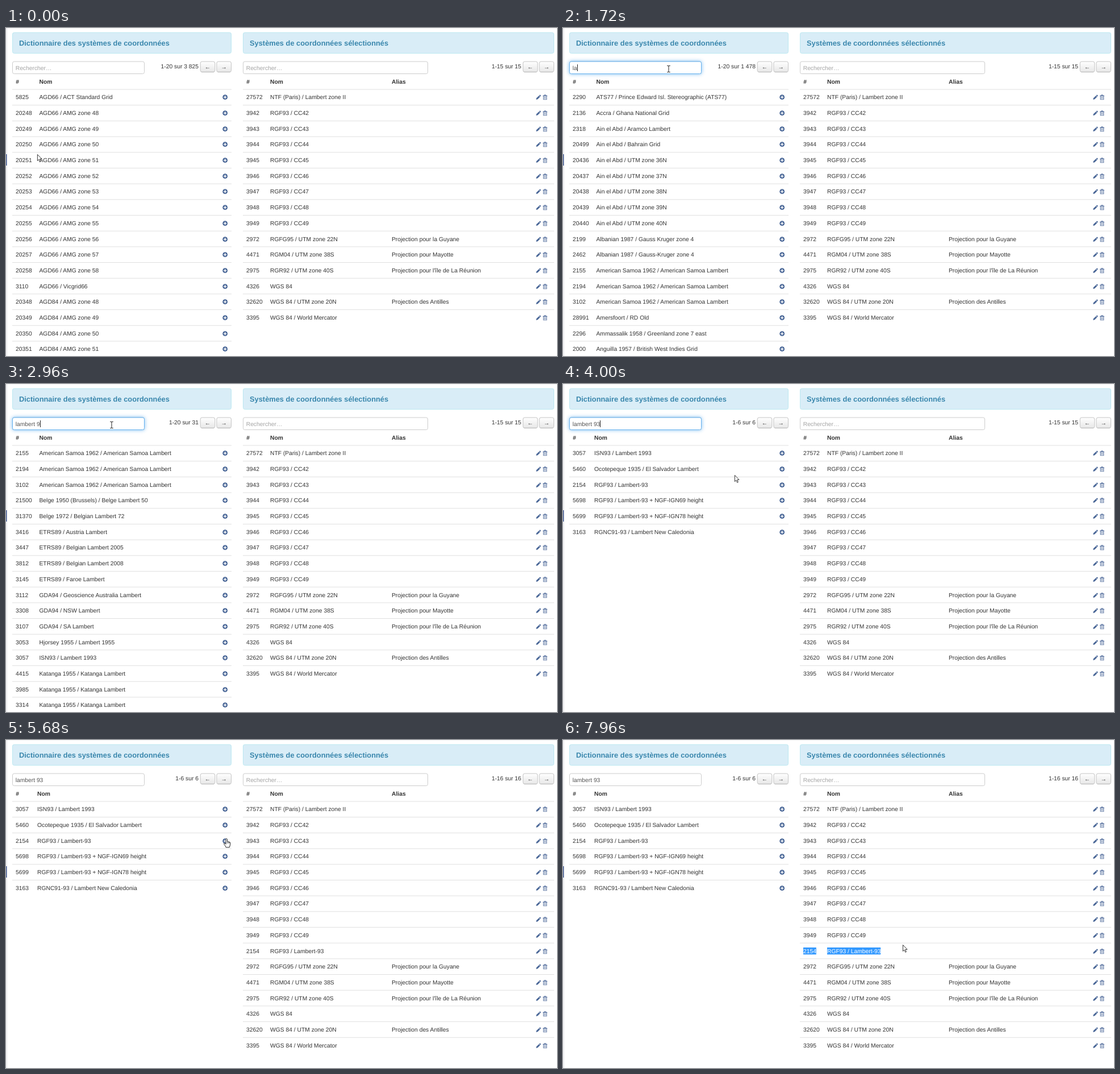
Recreate the animation shown at these times as an HTML page with a canvas. Size 970 by 577 pixels, loop 8 s.

```html
<!DOCTYPE html>
<html lang="fr">
<head>
<meta charset="utf-8">
<title>Systèmes de coordonnées</title>
<style>
  html, body { margin: 0; width: 100%; height: 100%; overflow: hidden; background: #fff; }
  canvas { display: block; }
</style>
</head>
<body>
<canvas id="stage" width="970" height="577"></canvas>
<script>
const ctx = document.getElementById('stage').getContext('2d');
const LOOP = 8000, STEP = 40;
const ROW_TOP = 107.6, ROW_PITCH = 27.68;
const FONT = '10.3px "Liberation Sans", Arial, sans-serif';
const BOLD = 'bold ' + FONT;
const TITLE = 'bold 12.85px "Liberation Sans", Arial, sans-serif';
const ICON = '#4a6797';

// Result lists: "id name"
const zones = (datum, base, from, to) =>
  Array.from({ length: to - from + 1 }, (_, i) => `${base + from + i} ${datum} / AMG zone ${from + i}`);
const initial = ['5825 AGD66 / ACT Standard Grid', ...zones('AGD66', 20200, 48, 58),
  '3110 AGD66 / Vicgrid66', ...zones('AGD84', 20300, 48, 51)];
const samoa = [2155, 2194, 3102].map(id => id + ' American Samoa 1962 / American Samoa Lambert');
const aramco = '2318 Ain el Abd / Aramco Lambert';
const islands = ['2296 Ammassalik 1958 / Greenland zone 7 east', '2000 Anguilla 1957 / British West Indies Grid'];
const withL = ['2290 ATS77 / Prince Edward Isl. Stereographic (ATS77)', '2136 Accra / Ghana National Grid',
  aramco, '20499 Ain el Abd / Bahrain Grid',
  ...[36, 37, 38, 39, 40].map(z => `${20400 + z} Ain el Abd / UTM zone ${z}N`),
  '2199 Albanian 1987 / Gauss Kruger zone 4', '2462 Albanian 1987 / Gauss-Kruger zone 4',
  ...samoa, '28991 Amersfoort / RD Old', ...islands];
const lambert9 = [...samoa, '21500 Belge 1950 (Brussels) / Belge Lambert 50',
  '31370 Belge 1972 / Belgian Lambert 72', '3416 ETRS89 / Austria Lambert',
  '3447 ETRS89 / Belgian Lambert 2005', '3812 ETRS89 / Belgian Lambert 2008',
  '3145 ETRS89 / Faroe Lambert', '3112 GDA94 / Geoscience Australia Lambert',
  '3308 GDA94 / NSW Lambert', '3107 GDA94 / SA Lambert', '3053 Hjorsey 1955 / Lambert 1955',
  '3057 ISN93 / Lambert 1993', ...[4415, 3985, 3314].map(id => id + ' Katanga 1955 / Katanga Lambert')];
const lambert93 = ['3057 ISN93 / Lambert 1993', '5460 Ocotepeque 1935 / El Salvador Lambert',
  '2154 RGF93 / Lambert-93', '5698 RGF93 / Lambert-93 + NGF-IGN69 height',
  '5699 RGF93 / Lambert-93 + NGF-IGN78 height', '3163 RGNC91-93 / Lambert New Caledonia'];

const results = [
  [0, '1-20 sur 3 825', initial],
  [1440, '1-20 sur 1 478', withL],
  [1840, '1-20 sur 412', [aramco, ...samoa, ...islands, ...lambert9.slice(3, 14)]],
  [2160, '1-20 sur 118', [aramco, ...lambert9.slice(0, 16)]],
  [2960, '1-20 sur 31', lambert9],
  [3120, '1-6 sur 6', lambert93]
];

const added = '2154 RGF93 / Lambert-93';
const selected = ['27572 NTF (Paris) / Lambert zone II',
  ...[42, 43, 44, 45, 46, 47, 48, 49].map(n => `39${n} RGF93 / CC${n}`),
  '2972 RGFG95 / UTM zone 22N|Projection pour la Guyane',
  '4471 RGM04 / UTM zone 38S|Projection pour Mayotte',
  '2975 RGR92 / UTM zone 40S|Projection pour l\'île de La Réunion',
  '4326 WGS 84', '32620 WGS 84 / UTM zone 20N|Projection des Antilles',
  '3395 WGS 84 / World Mercator'];
const selectedAfter = [...selected.slice(0, 9), added, ...selected.slice(9)];

const query = 'lambert 93';
const keyTimes = [1240, 1640, 1800, 1920, 2080, 2400, 2600, 2720, 2840, 3120];

// Pointer path: time, x, y
const path = [
  [40, 55, 222], [240, 201, 109], [480, 201, 109], [880, 186, 70], [1160, 186, 70], [1240, 186, 72],
  [3440, 186, 72], [4000, 302, 160], [4280, 371, 175], [4480, 386, 178], [5400, 386, 178], [5440, 386, 177],
  [5640, 386, 177], [5760, 393, 169], [6440, 527, 359], [6480, 527, 359], [6600, 545, 356],
  [6760, 561, 366], [7240, 421, 373], [7640, 421, 373], [7960, 598, 360]
];
const DRAG_START = 6760, DRAG_END = 7240;

const clamp01 = v => Math.max(0, Math.min(1, v));

function pointerAt(t) {
  const next = path.findIndex(p => p[0] > t);
  if (next < 0) return path[path.length - 1].slice(1);
  if (next === 0) return path[0].slice(1);
  const [t0, x0, y0] = path[next - 1], [t1, x1, y1] = path[next];
  const k = (t - t0) / (t1 - t0);
  return [x0 + (x1 - x0) * k, y0 + (y1 - y0) * k];
}

function text(str, x, y, color = '#333', font = FONT, align = 'left') {
  ctx.font = font;
  ctx.fillStyle = color;
  ctx.textAlign = align;
  ctx.fillText(str, x, y);
}

function box(x, y, w, h, fill, stroke) {
  ctx.beginPath();
  ctx.roundRect(x, y, w, h, 3);
  ctx.fillStyle = fill;
  ctx.fill();
  ctx.lineWidth = 1;
  ctx.strokeStyle = stroke;
  ctx.stroke();
}

function shape(points, fill, stroke, width = 1) {
  ctx.beginPath();
  points.forEach(([x, y]) => ctx.lineTo(x, y));
  ctx.closePath();
  if (fill) { ctx.fillStyle = fill; ctx.fill(); }
  if (stroke) { ctx.strokeStyle = stroke; ctx.lineWidth = width; ctx.lineJoin = 'round'; ctx.stroke(); }
}

function at(x, y, draw) {
  ctx.save();
  ctx.translate(x, y);
  draw();
  ctx.restore();
}

function plusIcon() {
  ctx.fillStyle = ICON;
  ctx.beginPath();
  ctx.arc(0, 0, 4.4, 0, 7);
  ctx.fill();
  ctx.fillStyle = '#fff';
  ctx.fillRect(-2.6, -0.7, 5.2, 1.4);
  ctx.fillRect(-0.7, -2.6, 1.4, 5.2);
}

function pencilIcon() {
  shape([[-4.3, 4.3], [-3.6, 1.5], [1.7, -3.8], [3, -4.1], [4.1, -3], [3.8, -1.7], [-1.5, 3.6]], ICON);
  shape([[0.9, -2.9], [2.9, -0.9]], null, '#fff', 0.6);
}

function trashIcon() {
  ctx.strokeStyle = ICON;
  ctx.lineWidth = 0.8;
  ctx.strokeRect(-2.9, -2.4, 5.8, 6.5);
  ctx.strokeRect(-1.3, -4, 2.6, 1.6);
  ctx.fillStyle = ICON;
  ctx.fillRect(-4, -2.9, 8, 0.9);
  for (const x of [-1.5, 0, 1.5]) ctx.fillRect(x - 0.3, -1, 0.6, 3.8);
}

function button(x, label) {
  const shade = ctx.createLinearGradient(0, 59, 0, 78);
  shade.addColorStop(0, '#fff');
  shade.addColorStop(1, '#e6e6e6');
  box(x, 59, 25.6, 18.5, shade, '#c4c4c4');
  ctx.fillStyle = '#b3b3b3';
  ctx.fillRect(x + 2, 77, 21.6, 1);
  text(label, x + 12.8, 72, '#333', FONT, 'center');
}

function searchField(x, width, value, focus) {
  if (focus > 0) {
    ctx.save();
    ctx.globalAlpha = focus;
    ctx.shadowColor = 'rgba(82,168,236,.7)';
    ctx.shadowBlur = 6;
    box(x, 59, width, 21.5, '#fff', '#52a8ec');
    ctx.restore();
  }
  box(x, 59, width, 21.5, '#fff', '#ccc');
  if (focus > 0) {
    ctx.globalAlpha = focus;
    box(x, 59, width, 21.5, '#fff', '#66b1ee');
    ctx.globalAlpha = 1;
  }
  text(value || 'Rechercher…', x + 5.2, 73.5, value ? '#555' : '#a3a3a3');
}

function panel(x, width, title, count) {
  box(x + 0.5, 8, width - 1, 36.5, '#d9edf7', '#bce8f1');
  text(title, x + 12, 30.5, '#3a87ad', TITLE);
  text(count, x + width - 58, 71.3, '#333', FONT, 'right');
  button(x + width - 54.8, '←');
  button(x + width - 26.1, '→');
  text('#', x + 6.2, 98, '#333', BOLD);
}

const baseline = i => Math.round(125.4 + ROW_PITCH * i);

function table(rows, x, width, nameX, drawIcons) {
  rows.forEach((row, i) => {
    const top = ROW_TOP + ROW_PITCH * i, y = baseline(i);
    const [main, alias = ''] = row.split('|');
    const gap = main.indexOf(' ');
    ctx.fillStyle = '#ddd';
    ctx.fillRect(x, top, width, 0.9);
    text(main.slice(0, gap), x + 6, y);
    text(main.slice(gap + 1), nameX, y);
    text(alias, 679, y);
    drawIcons(y - 3.3);
  });
}

// Highlights the part of a text that lies right of the dragged position
function highlight(str, x, dragX, y) {
  ctx.font = FONT;
  const edge = n => x + ctx.measureText(str.slice(0, n)).width;
  let first = 0;
  while (first < str.length && edge(first) < dragX) first++;
  if (first === str.length) return;
  const left = edge(first), width = edge(str.length) - left;
  ctx.save();
  ctx.beginPath();
  ctx.rect(left, y - 10, width, 12.6);
  ctx.clip();
  ctx.fillStyle = '#39f';
  ctx.fillRect(left, y - 10, width, 12.6);
  text(str, x, y, '#fff');
  ctx.restore();
}

const arrow = () =>
  shape([[0.4, 0.5], [0.4, 11.6], [2.9, 9.3], [4.7, 13.4], [6.4, 12.6], [4.6, 8.6], [8, 8.4]], '#fff', '#222', 0.9);

function iBeam() {
  ctx.strokeStyle = '#222';
  ctx.lineWidth = 1;
  ctx.beginPath();
  for (const s of [-1, 1]) {
    ctx.moveTo(-2.8, 5.7 * s);
    ctx.lineTo(-1, 5.7 * s);
    ctx.lineTo(0, 5 * s);
    ctx.lineTo(1, 5.7 * s);
    ctx.lineTo(2.8, 5.7 * s);
  }
  ctx.moveTo(0, -5);
  ctx.lineTo(0, 5);
  ctx.stroke();
}

function hand() {
  shape([[-1.3, 0], [0, -1], [1.2, 0], [1.2, 4.3], [3.4, 4.6], [6, 5.6], [6.5, 7], [6.2, 10.5], [5, 14.5],
    [-1.2, 14.5], [-2, 12.4], [-4.5, 8.8], [-4.4, 7.4], [-3, 7.3], [-1.3, 9]], '#fff', '#222', 1);
  ctx.fillStyle = '#222';
  for (const x of [1, 2.8, 4.5]) ctx.fillRect(x, 5, 0.7, 2.6);
}

function drawPointer(t) {
  const [x, y] = pointerAt(t);
  const inField = x < 243 && y > 58 && y < 81;
  const dragging = t >= DRAG_START && t <= DRAG_END && y > 364 && y < 379 &&
    ((x > 465 && x < 561) || (x > 423 && x < 447));
  const onPlus = Math.abs(x - 386) < 5 && Math.abs(y - 177) < 5;
  at(x, y, inField || dragging ? iBeam : onPlus ? hand : arrow);
}

function drawPage(t) {
  ctx.fillStyle = '#fff';
  ctx.fillRect(0, 0, 970, 577);
  ctx.fillStyle = '#f6f6f6';
  ctx.fillRect(0, 0, 970, 1);
  ctx.fillStyle = '#e4e4e8';
  ctx.fillRect(1, 0, 1, 577);
  ctx.fillStyle = '#4a6197';
  ctx.fillRect(0, 222, 1.5, 20);

  const [, count, rows] = results.filter(r => r[0] <= t).pop();
  const typed = query.slice(0, keyTimes.filter(k => k <= t).length);
  const focus = Math.min(clamp01((t - 840) / 200), clamp01((4720 - t) / 120));
  const nameX = rows === lambert93 ? 55 : 58.5;

  panel(11, 386, 'Dictionnaire des systèmes de coordonnées', count);
  text('Nom', nameX, 98, '#333', BOLD);
  searchField(11.5, 232, typed, focus);
  table(rows, 11, 386, nameX, y => at(385.7, y, plusIcon));

  const blinkOff = (t >= 3280 && t < 3780) || t >= 4280;
  if (focus > 0 && !blinkOff) {
    ctx.font = FONT;
    ctx.fillStyle = '#222';
    ctx.fillRect(Math.round(16.7 + ctx.measureText(typed).width), 64, 1, 12);
  }

  const chosen = t >= 4960 ? selectedAfter : selected;
  panel(417, 548, 'Systèmes de coordonnées sélectionnés', `1-${chosen.length} sur ${chosen.length}`);
  text('Nom', 465, 98, '#333', BOLD);
  text('Alias', 679, 98, '#333', BOLD);
  searchField(417.5, 325, '', 0);
  table(chosen, 417, 548, 465, y => {
    at(937.5, y, pencilIcon);
    at(949, y, trashIcon);
  });

  if (t >= DRAG_START) {
    const dragX = pointerAt(Math.min(t, DRAG_END))[0], y = baseline(9);
    highlight('RGF93 / Lambert-93', 465, dragX, y);
    highlight('2154', 423, dragX, y);
  }
  drawPointer(t);
}

ctx.textRendering = 'geometricPrecision';
function tick() {
  const t = performance.now() % LOOP;
  drawPage(Math.floor(t / STEP) * STEP);
  requestAnimationFrame(tick);
}
tick();
</script>
</body>
</html>
```
